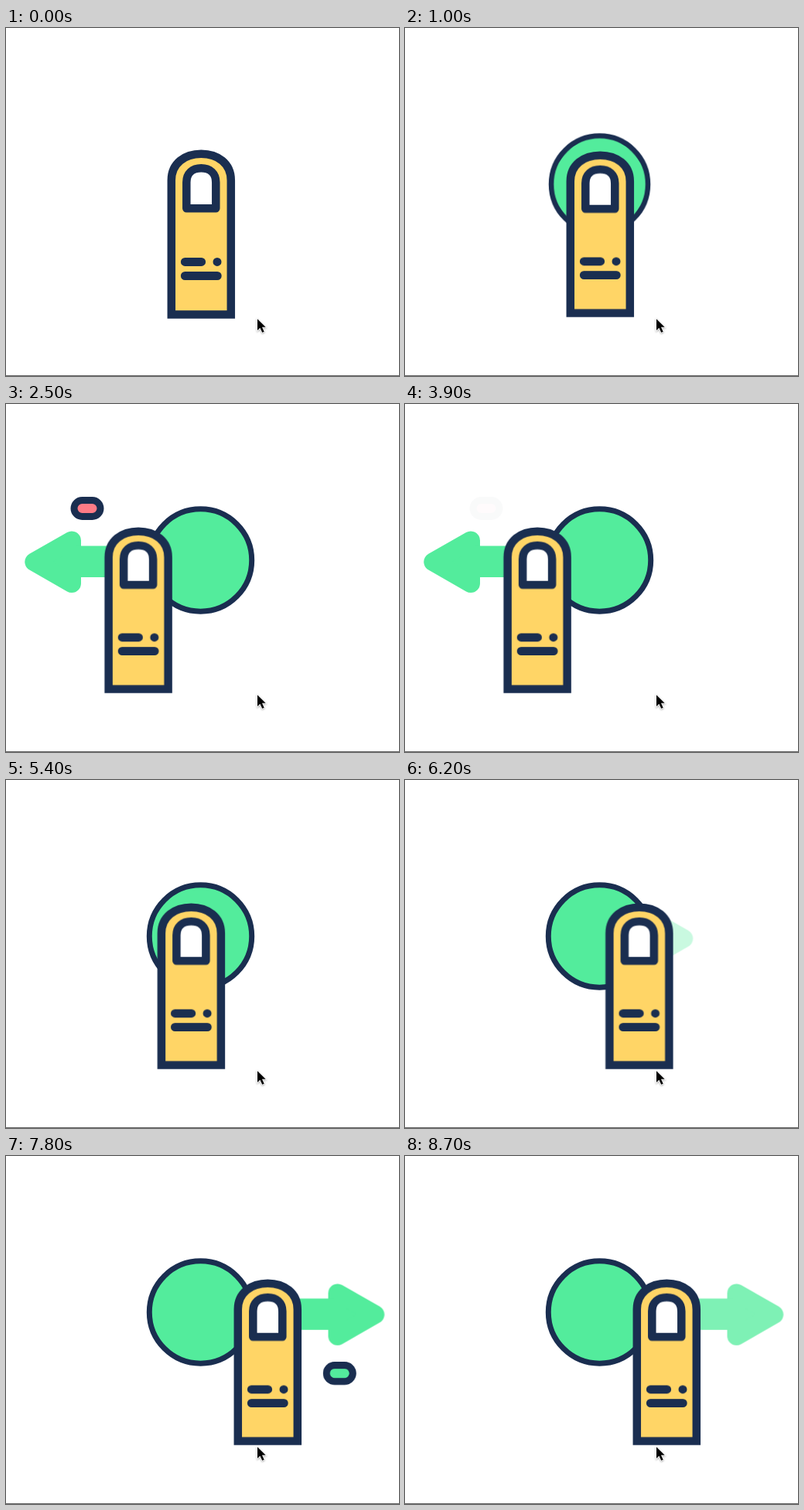
Write an HTML page without scripts that moves like this. It is 508 by 450 pixels and loops after 10000 ms.

```html
<!DOCTYPE html>
<html lang="en">
<head>
<meta charset="utf-8">
<title>Swipe gesture</title>
<style>
  :root { --navy: #1a2e50; --green: #53ec9c; --yellow: #ffd566; --red: #ff7b86; }
  html, body { margin: 0; width: 100%; height: 100%; overflow: hidden; background: #fff; }
  svg { display: block; width: 100%; height: 100%; }

  .finger, .press, .disc, .arrow, .pill { animation: 10s ease-in-out infinite; }
  .outline { stroke: var(--navy); }
  .arrow { fill: var(--green); }
  .head { stroke: var(--green); stroke-width: 24; stroke-linejoin: round; }

  .finger { animation-name: swipe; }
  @keyframes swipe {
    0%, 11.7% { transform: none; }
    21.7%, 47.5% { transform: translateX(-81.2px); }
    56.5% { transform: none; }
    66.5%, 100% { transform: translateX(86px); }
  }

  .press { transform-origin: 252px 267px; animation-name: press; }
  @keyframes press {
    0%, 1% { transform: none; }
    6%, 100% { transform: scaleY(.982); }
  }

  .disc { transform-origin: 251.5px 202px; animation-name: grow; }
  @keyframes grow {
    0%, 1% { transform: scale(0); }
    11.8%, 100% { transform: none; }
  }

  .arrow.left { animation-name: arrow-left; }
  @keyframes arrow-left {
    0%, 13.1% { transform: translateX(171px); opacity: 0; }
    22.1%, 47.5% { transform: none; opacity: 1; }
    52.5%, 100% { transform: none; opacity: 0; }
  }

  .arrow.right { animation-name: arrow-right; }
  @keyframes arrow-right {
    0%, 58.5% { transform: translateX(-171px); opacity: 0; }
    67.5%, 83.7% { transform: none; opacity: 1; }
    87%, 100% { transform: none; opacity: .75; }
  }

  .pill.left { transform-origin: 105px 135px; animation-name: pill-left; }
  @keyframes pill-left {
    0%, 20.5% { transform: scale(0); opacity: 1; }
    24%, 34% { transform: none; opacity: 1; }
    39%, 47.9% { transform: none; opacity: .02; }
    48%, 100% { transform: none; opacity: 0; }
  }

  .pill.right { transform-origin: 431.2px 281px; animation-name: pill-right; }
  @keyframes pill-right {
    0%, 66.5% { transform: scale(0); opacity: 1; }
    71% { transform: scale(1.35); opacity: 1; }
    75%, 79% { transform: none; opacity: 1; }
    84%, 100% { transform: none; opacity: 0; }
  }
</style>
</head>
<body>
<svg viewBox="0 0 508 450" preserveAspectRatio="none">
  <defs>
    <g id="arrow">
      <path class="head" d="M36.3 204.2 85 176.5V232Z"/>
      <path d="M90 183.6H190V223.9H90Z"/>
    </g>
    <rect id="pill" x="-17" y="-10.5" width="34" height="21" rx="10.5" stroke-width="9"/>
  </defs>

  <g class="arrow left"><use href="#arrow"/></g>
  <g class="arrow right"><use href="#arrow" transform="matrix(-1 0 0 1 513.5 .8)"/></g>

  <circle class="disc outline" cx="251.5" cy="202" r="66.2" fill="#53ec9c" stroke-width="7"/>

  <g class="pill left outline"><use href="#pill" x="105" y="135" fill="#ff7b86"/></g>
  <g class="pill right outline"><use href="#pill" x="431.2" y="281" fill="#53ec9c"/></g>

  <g class="finger">
    <g class="press outline" fill="none" stroke-width="10.5">
      <path d="M213.8 370.6V197C213.8 175 231 162.8 252.3 162.8S290.8 175 290.8 197V370.6Z" fill="#ffd566"/>
      <path d="M233.3 233.3V199.5C233.3 188 241 181.2 252.3 181.2S271.3 188 271.3 199.5V233.3Z" fill="#fff" stroke-linejoin="round"/>
      <path d="M231.4 302.4H252.6M273 302.4h.01M231.4 320.5H273.2" stroke-width="11" stroke-linecap="round"/>
    </g>
  </g>

  <path d="M325 376.3V391l3.4-3.2 2.8 6 2.5-1.1-2.7-5.9h4.7Z" fill="#000" stroke="#fff" stroke-width="1.6"
        paint-order="stroke" style="filter: drop-shadow(0 1px 1px #0005)"/>
  <path d="M0 449.5H508" stroke="#666"/>
</svg>
</body>
</html>
```
